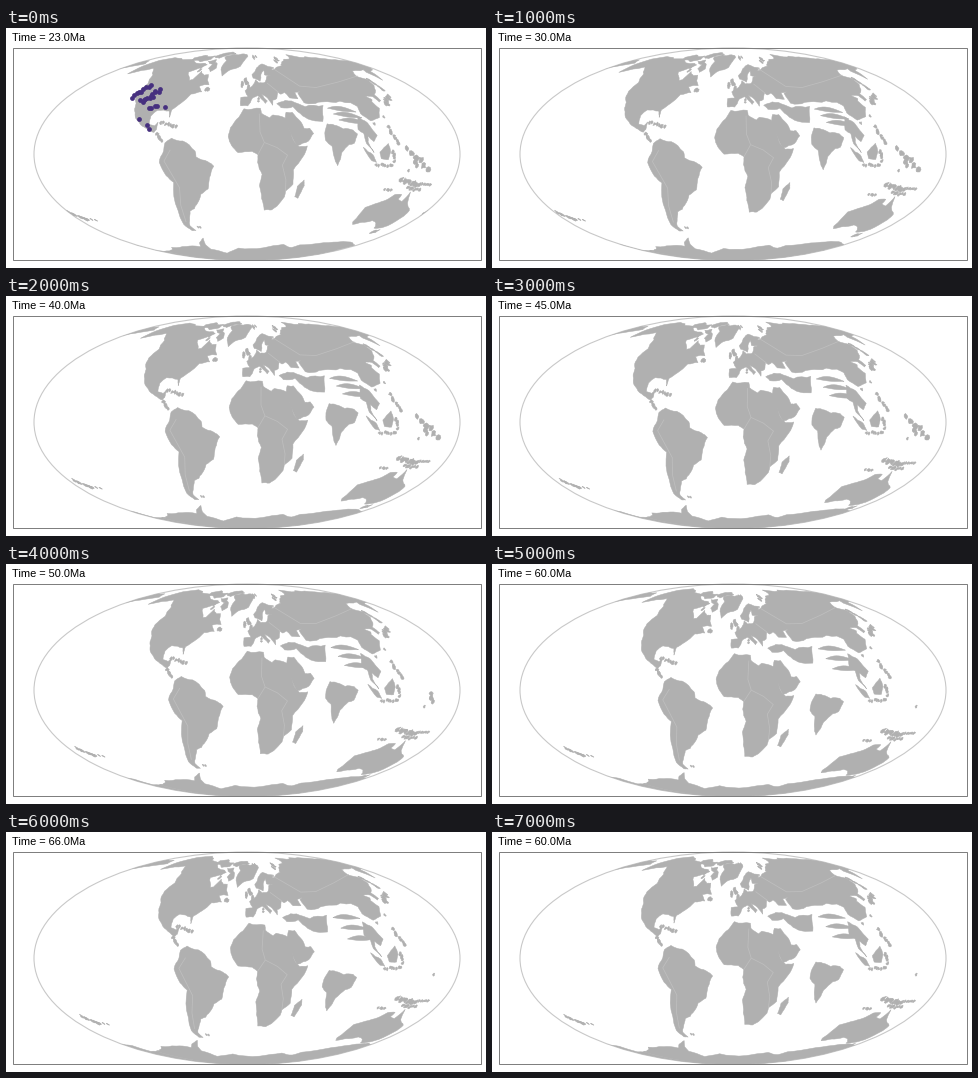
Write a matplotlib script that moves like this. It is 480 by 240 pixels and loops after 8 s.

```python
import numpy as np
import matplotlib.pyplot as plt
from matplotlib.animation import FuncAnimation
from matplotlib.collections import LineCollection, PolyCollection
from matplotlib.patches import Ellipse, Rectangle

W, H, DPI = 480, 240, 100
PX = 72 / DPI
CX, CY, RX, RY = 241, 126.2, 213, 106.2
LAND, SEAM, RIM, DOT = "#b0b0b0", "#bebebe", "#c8c8c8", "#46307f"
SEQUENCE = [23, 30, 40, 45, 50, 60, 66, 60]
rng = np.random.default_rng(7)


# Pace of drift: share of the 60 Ma rotation, u = age / 60
def steady(u):
    return u


def speeding(u):
    return .3 + .73 * u ** 2


def slowing(u):
    return 1 - abs(1 - u) ** 1.9


# Rotation vector in degrees at 60 Ma, and pace
PLATES = {
    "namerica": ((-3.6, 11, 22), steady),
    "greenland": ((-3.4, 10.6, 18.4), steady),
    "carib": ((-2, 4.5, 18), steady),
    "samerica": ((0, 7, 18), steady),
    "africa": ((-11, 10.5, .5), steady),
    "arabia": ((-10, 10, .5), steady),
    "eurasia": ((2, 7.4, 8.3), steady),
    "iran": ((-3, 10, 7), steady),
    "indochina": ((-3, 7.4, 9), steady),
    "india": ((-36, 12, -1), speeding),
    "australia": ((-20.7, -17.2, 6.4), slowing),
    "antarctica": ((-5, 5, 4.5), steady),
    "zealand": ((0, 0, 18), steady),
    "pacific": ((0, 0, 30), steady),
}

lands, seams = [], []


def roughen(pts, amount):
    """Coast between key points by midpoint displacement."""
    for _ in range(2):
        step = (np.roll(pts, -1, axis=0) - pts + 180) % 360 - 180
        normal = step[:, ::-1] * (-1, 1)
        mid = pts + step / 2 + normal * rng.uniform(-amount, amount, (len(pts), 1))
        pts = np.stack([pts, mid], axis=1).reshape(-1, 2)
    return pts


def land(plate, *pts, rough=.07, until=99):
    lands.append((plate, roughen(np.array(pts, float), rough), until))


def islands(plate, start, end, n, size, until=99):
    """Random blobs strung between two places."""
    turn = np.arange(0, 2 * np.pi, .8)
    ring = np.column_stack([np.cos(turn), np.sin(turn)])
    for centre in np.linspace(start, end, n):
        radius = size * rng.uniform(.5, 1.3, (len(turn), 1))
        lands.append((plate, centre + rng.normal(0, size / 4, 2) + ring * radius, until))


def seam(plate, *pts):
    seams.append((plate, np.array(pts, float), 99))


def strip(start, end, n):
    return np.linspace(start, end, n) + rng.normal(0, .6, (n, 2))


# Americas
land("namerica",
     (-90, 14), (-97, 16), (-105.5, 20), (-111, 23.5), (-115.5, 29),
     (-117.5, 33), (-122.4, 37.5), (-124.3, 41), (-124, 48), (-132, 55),
     (-146, 60.5), (-163, 55), (-166, 62), (-166, 68), (-157, 71),
     (-128, 70), (-95, 68), (-82, 68), (-94, 60), (-82, 53.5), (-79, 54.5),
     (-78, 62), (-70, 59), (-65, 60), (-56, 52), (-66, 50), (-60, 46),
     (-70, 43.5), (-75.5, 36), (-81, 31), (-80.3, 25.5), (-83, 29.8),
     (-94, 29.5), (-97.5, 25), (-96, 19), (-91, 18.5), (-89, 21.3), (-88.5, 16))
land("namerica", (-80, 73.5), (-68, 70), (-62, 66), (-66, 62.5), (-73, 65), (-74, 69), (-89, 71))
land("namerica", (-125, 72), (-116, 69.3), (-100, 69.5), (-91, 73), (-98, 76.5), (-120, 75.5))
land("namerica", (-80, 75), (-95, 75.5), (-95, 80.5), (-80, 83), (-64, 82.3), (-76, 79))
islands("namerica", (-57, 49), (-55, 47.5), 2, 1.8)
islands("namerica", (-86, 65), (-82, 63.5), 2, 1.6)
land("greenland",
     (-72, 78), (-56, 74), (-53, 67), (-44, 60), (-38, 65.5), (-23, 70),
     (-19, 76), (-14, 81), (-32, 83.3), (-62, 81.5))
islands("carib", (-84, 22), (-70, 18.8), 7, 1.3)
islands("carib", (-85, 14), (-80, 9), 6, 1.1)
land("samerica",
     (-72, 12), (-62, 10.5), (-51, 4), (-50, 0), (-40, -3), (-35, -6),
     (-39, -14), (-41, -22), (-48, -26), (-53, -33), (-57, -37),
     (-62, -39), (-66, -46), (-69, -51), (-65.5, -54.8), (-70, -55),
     (-75, -50), (-73.5, -39), (-70.3, -18.4), (-76, -14), (-81, -5), (-77.5, 3), (-77, 8.5))
islands("samerica", (-60.5, -51.8), (-58.5, -51.8), 2, .9)

# Africa and Arabia
land("africa",
     (-17.5, 14.7), (-16.5, 21), (-10, 29), (-6, 35.5), (10, 37), (11, 33.5),
     (19, 30.5), (22, 32.7), (33, 31), (35.5, 24), (39, 15.5), (44, 11),
     (51, 11.5), (47, 4), (39.5, -5), (40.5, -15), (35, -20), (35, -24),
     (30, -31), (26, -34), (19, -34.5), (15, -26), (12, -17), (13.5, -9),
     (9, -1), (9, 4.3), (4, 6.3), (-8, 4.5), (-14, 9))
land("africa", (49.5, -12), (50.3, -16), (47, -25), (44, -24), (44.5, -16.5))
land("arabia", (33, 28), (35, 35.5), (41, 36), (48, 30), (51, 25), (56, 25.5),
     (59, 22), (54, 16.5), (44, 12.8), (39, 20))
seam("africa", (9, 33), (10, 20), (14, 13), (9, 4.5))
seam("africa", (14, 13), (25, 10), (34, 5), (30, -2), (34, -12), (35, -20))
seam("samerica", (-72, 4), (-77, -4), (-66, -22), (-69, -35), (-71, -48))

# Eurasia
land("eurasia",
     (62, 68.5), (62, 47), (49, 45.5), (49.5, 40.5), (41.5, 41.5), (38, 46),
     (33.5, 44.7), (31, 46.5), (28, 41.5), (23.5, 40.3), (22.5, 36.7),
     (19, 42), (13, 45.3), (18, 40), (15.7, 38.3), (9, 44.3), (3, 42.5),
     (-2, 36.8), (-9, 37), (-9, 43.2), (-1.5, 43.5), (-4.6, 48.3),
     (4, 52), (8.5, 57), (12, 54.3), (20, 54.8), (24, 59.3), (30, 60),
     (22, 61), (24, 65.5), (17.5, 61.5), (14, 55.7), (6, 58.5), (5, 61.5),
     (14, 67.5), (26, 71), (41, 67), (35, 65), (46, 67))
land("eurasia",
     (57, 69), (68, 72), (80, 73.5), (104, 77.7), (114, 74), (140, 72.7),
     (160, 70.3), (180, 69.3), (190, 66.3), (178, 62.5), (163, 58.5),
     (157, 51), (156, 58), (163, 62), (142, 59.3), (135, 54.7), (141, 52),
     (139, 47), (128, 40), (129, 35.5), (126.5, 34.5), (125, 38.5),
     (118, 39), (121.5, 36.5), (119.5, 35), (122, 30), (117, 23.5),
     (108, 21.5), (102, 27), (103, 32), (99, 35), (80, 36.5), (68, 37),
     (54, 37.3), (52, 45), (57, 47))
islands("eurasia", (54, 72), (65, 76), 5, 1.6)
islands("eurasia", (15, 78.3), (24, 79), 3, 2)
islands("eurasia", (-4, 57.5), (-.5, 52), 4, 2)
islands("eurasia", (-8, 53), (-8, 54), 2, 1.7)
islands("eurasia", (9, 40), (9, 42.3), 2, 1)
islands("eurasia", (131, 33), (141, 38), 7, 1.7)
islands("eurasia", (142, 43.5), (143, 52), 5, 1.3)
islands("eurasia", (110, 19), (121, 24), 2, 1)
seam("eurasia", (38, 67), (58, 50), (75, 48), (105, 51), (137, 55))
seam("eurasia", (22, 54), (32, 46))
land("iran",
     (26.5, 39.5), (36, 41.8), (48, 39), (54, 36.5), (72, 36.5), (68, 30),
     (66, 25.3), (57, 26.5), (49, 30), (42, 37), (30, 36.5))

# Highland slivers that part from the continent one after another
s = np.linspace(0, 1, 12)
for i in range(3):
    name = f"sliver{i}"
    PLATES[name] = ((-4 - 5 * i, 7.4, 8), steady)
    lon, lat = 74 + 3 * i + 25 * s, 34.5 - 2.5 * i - 4 * s ** 2
    half = 1.7 * np.sin(np.pi * s)
    edges = [np.column_stack([lon, lat + half]), np.column_stack([lon, lat - half])[::-1]]
    land(name, *np.vstack(edges), rough=0)

# Southeast Asia
land("indochina",
     (98, 27), (104, 22.5), (106, 18), (109, 13), (105, 9), (101, 13),
     (100, 9), (104, 1.5), (98.5, 8), (98, 15), (94, 18))
land("indochina", (95.3, 5.6), (103, 0), (106, -5.5), (102, -4))
land("indochina", (109, 1.5), (117, 7), (118, 1), (116, -4), (110, -3))
islands("indochina", (106, -7), (120, -8.5), 8, 1.1)
islands("indochina", (120, 1), (121, -5), 5, 1.3)
islands("indochina", (121, 17.5), (125.5, 7), 7, 1.3)

# India, with the part now lost under the mountains
land("india",
     (71, 36.5), (67, 30), (67, 25), (72.5, 21), (74, 14), (77.5, 7.5),
     (80, 13), (81, 16.5), (88, 21.5), (93, 22), (98, 28), (95, 31), (86, 32.5), (78, 35.5))

# South
land("australia",
     (114, -22), (115.5, -33), (118, -35), (124, -33), (131, -31.6),
     (137.5, -34.5), (141, -38.3), (147, -38.7), (150, -37.4), (153.3, -30),
     (153, -25.5), (146, -19), (142.5, -10.7), (140.5, -17.5), (136, -15.5),
     (136.5, -12.2), (131, -12), (128, -15), (122.3, -18))
islands("australia", (146, -41.8), (147, -42.3), 2, 1.6)
islands("australia", (131, -1.5), (146, -6), 9, 1.7)
islands("australia", (139, -7.5), (149, -9.8), 6, 1.2)
islands("australia", (149, -6), (156, -7), 5, .9)
islands("australia", (120, -8.5), (126, -8.7), 4, .9)
land("antarctica",
     (-180, -78), (-150, -77), (-135, -74.5), (-100, -73), (-75, -72.5),
     (-68, -68), (-57, -63.3), (-62, -70), (-61, -74.5), (-35, -78),
     (-10, -71), (30, -69.5), (55, -66), (73, -69.5), (80, -67),
     (110, -66), (135, -66), (160, -69.5), (170, -71.5), (165, -77), rough=.03)
islands("zealand", (-187, -42), (-179, -46.5), 6, 1.6)
islands("zealand", (-177, -47), (-170, -47.5), 3, .8)
islands("pacific", (124, 4), (143, -11), 6, 2, until=47)
islands("pacific", (130, -2), (133, -8), 4, 1.8, until=55)
islands("pacific", (127, -11), (127, -11), 1, 1)

FINDS = np.vstack([
    strip((126, 68), (145, 57), 9), strip((134, 73), (147, 69), 8),
    strip((146, 66), (154, 61), 5), strip((143, 79), (151, 78), 4),
    strip((140, 98), (142, 101), 2), [(159, 79), (133, 91)]])


def rotation(plate, age):
    """Rodrigues matrix of a plate at an age."""
    vec, pace = PLATES[plate]
    v = np.radians(vec) * pace(age / 60)
    if plate == "arabia":
        v = v - np.radians((4, 1.8, 2.6))  # Red Sea still closed
    angle = np.linalg.norm(v)
    x, y, z = v / angle
    k = np.array([[0, -z, y], [z, 0, -x], [-y, x, 0]])
    return np.eye(3) + np.sin(angle) * k + (1 - np.cos(angle)) * k @ k


def mollweide(lon, lat):
    t = lat * .9
    for _ in range(12):
        slope = np.maximum(2 + 2 * np.cos(2 * t), 1e-4)
        t = t - (2 * t + np.sin(2 * t) - np.pi * np.sin(lat)) / slope
        t = np.clip(t, -np.pi / 2, np.pi / 2)
    return np.column_stack([CX + RX * lon / np.pi * np.cos(t), CY - RY * np.sin(t)])


def project(plate, coords, age, closed):
    """Stage paths of a moved outline, with copies across the date line."""
    pts = np.vstack([coords, coords[:1]]) if closed else coords
    lon, lat = np.radians(pts).T
    xyz = np.array([np.cos(lat) * np.cos(lon), np.cos(lat) * np.sin(lon), np.sin(lat)])
    x, y, z = rotation(plate, age) @ xyz
    lon, lat = np.unwrap(np.arctan2(y, x)), np.arcsin(np.clip(z, -1, 1))
    if closed and abs(lon[-1] - lon[0]) > np.pi:
        pole = np.copysign(np.pi / 2, lat[0])
        down = np.linspace(lat[-1], pole, 15)
        lon = np.concatenate([lon, np.full(15, lon[-1]), np.full(15, lon[0])])
        lat = np.concatenate([lat, down, down[::-1]])
    paths = [mollweide(lon + turn, lat) for turn in (-2 * np.pi, 0, 2 * np.pi)]
    return [p for p in paths if p[:, 0].max() > CX - RX and p[:, 0].min() < CX + RX]


def paths_at(items, age, closed):
    return [p for plate, coords, until in items if age <= until
            for p in project(plate, coords, age, closed)]


fig = plt.figure(figsize=(W / DPI, H / DPI), dpi=DPI, facecolor="white")
ax = fig.add_axes([0, 0, 1, 1])
ax.set(xlim=(0, W), ylim=(H, 0))
ax.axis("off")

globe = Ellipse((CX, CY), 2 * RX, 2 * RY, fc="none", ec=RIM, lw=1.1 * PX)
ax.add_patch(globe)
ground = PolyCollection([], fc=LAND, ec=LAND, lw=.5 * PX, zorder=2)
cracks = LineCollection([], colors=SEAM, lw=.8 * PX, zorder=3)
for layer in (ground, cracks):
    ax.add_collection(layer, autolim=False)
    layer.set_clip_path(globe)
finds = ax.scatter(*FINDS.T, s=(4.8 * PX) ** 2, c=DOT, lw=0, zorder=4)
ax.add_patch(Rectangle((6.5, 19.5), 468, 212, fc="none", ec="#7f7f7f", lw=PX, zorder=5))
title = ax.text(6.5, 13, "", family="Liberation Sans", size=11 * PX, va="baseline")


def draw(i):
    age = SEQUENCE[i]
    ground.set_verts(paths_at(lands, age, True))
    cracks.set_segments(paths_at(seams, age, False))
    finds.set_visible(age == 23)
    title.set_text(f"Time = {age:.1f}Ma")
    return ground, cracks, finds, title


anim = FuncAnimation(fig, draw, frames=len(SEQUENCE), interval=1000, repeat=True, repeat_delay=0)
plt.show()
```
